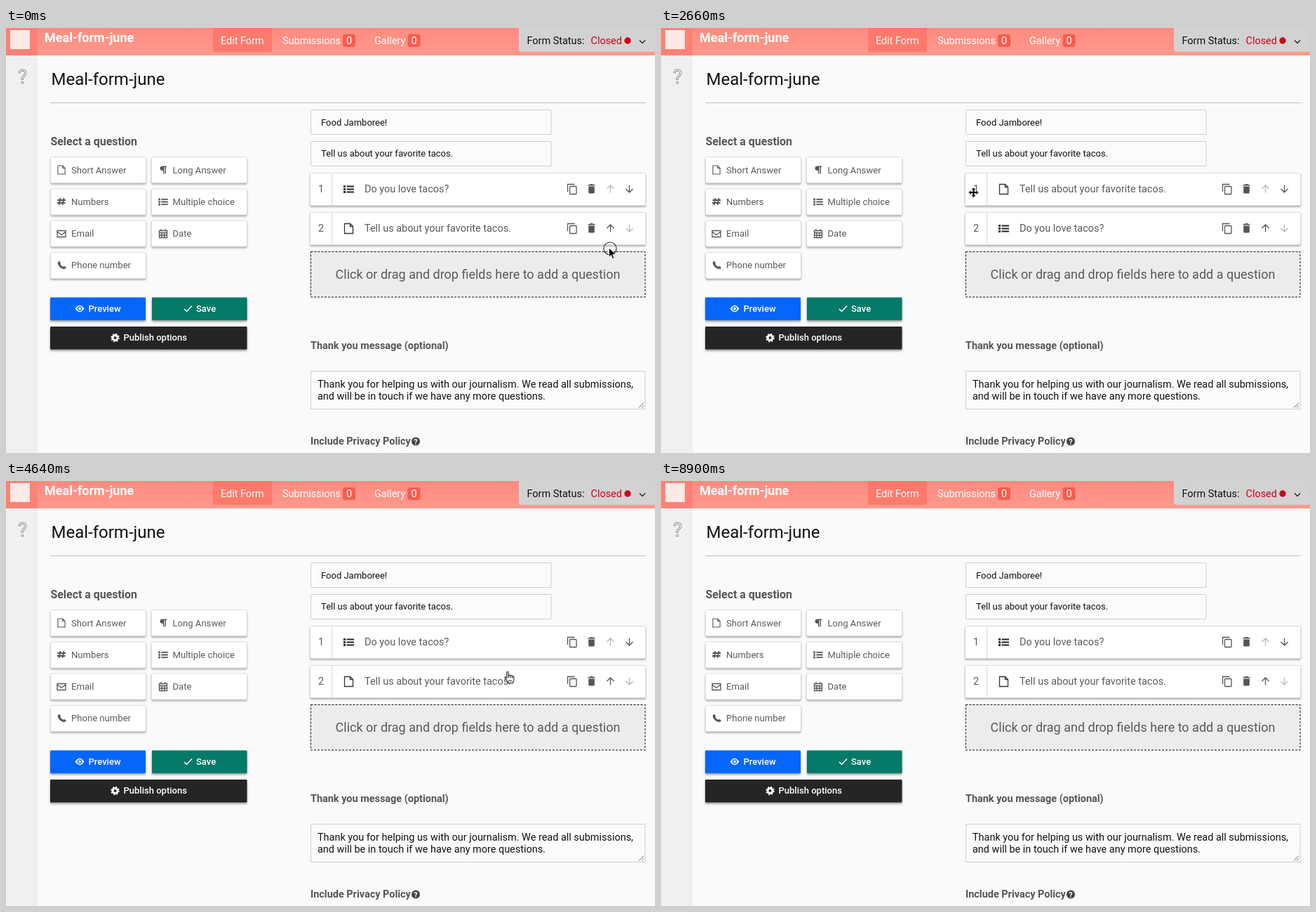
These frames come from a looping animation (925x605 px, 9950 ms). An HTML page:

```html
<!DOCTYPE html>
<html lang="en">
<head>
<meta charset="utf-8">
<title>Form editor</title>
<style>
html, body { margin: 0; width: 100%; height: 100%; overflow: hidden; background: #fafafa; }
svg { display: block; width: 925px; height: 605px; }
text { font: 14.45px Roboto, Arial, sans-serif; fill: #111; white-space: pre; }
.bold { font-weight: 700; fill: #555; }
.small { font-size: 13.1px; }
.grey { fill: #5a5a5a; }
.white { fill: #fff; }
.medium { font-size: 13px; font-weight: 500; fill: #fff; }
.mid { text-anchor: middle; }
.line { fill: none; stroke: #555; stroke-width: 1.3; }
.card { fill: #fff; stroke: #dcdcdc; filter: drop-shadow(0 2px 1px rgba(0,0,0,.28)); }
.field { fill: #fbfbfb; stroke: #cfcfcf; }
.btn { filter: drop-shadow(0 2px 1.5px rgba(0,0,0,.4)); }
.dim { opacity: .42; }

/* one loop: 9950ms, 1% = 99.5ms */
.move, .order, .hole, .lower, .zone, .arrow, .hand, .mover, .ring {
  animation: 9950ms step-end infinite;
}
.move { animation-name: move; animation-timing-function: ease-in-out; }
.order { animation-name: order; }
.hole { animation-name: hole; }
.lower { animation-name: lower; }
.zone { animation-name: zone; }
.arrow { animation-name: arrow; }
.hand { animation-name: hand; }
.mover { animation-name: mover; }
.ring { animation-name: ring; }
.ghost1, .ghost2 { opacity: .78; animation: ghost1 9950ms step-end infinite; }
.ghost2 { animation-name: ghost2; }

@keyframes move {
  0%, .1% { transform: translate(861px, 314px); }
  7.24%, 8.9% { transform: translate(614.5px, 283px); }
  11.26%, 12.9% { transform: translate(438px, 276px); }
  15.78%, 18.6% { transform: translate(447px, 284.5px); }
  20.5%, 22.01% { transform: translate(444.3px, 240.7px); }
  27.34%, 29.5% { transform: translate(445.5px, 234px); }
  34.17% { transform: translate(444.2px, 283px); }
  35.98%, 37.4% { transform: translate(445.5px, 284.5px); }
  42% { transform: translate(448px, 231px); }
  43.52%, 44.7% { transform: translate(448px, 222px); }
  46.63%, 48.3% { transform: translate(715.5px, 269px); }
  51.76%, 53.7% { transform: translate(881px, 287px); }
  56.88%, 58.8% { transform: translate(866.5px, 285.5px); }
  61.1%, 67.5% { transform: translate(858.5px, 284px); }
  71.66%, 84.1% { transform: translate(863.5px, 280px); }
  86.43%, 88.1% { transform: translate(881px, 474px); }
  89.45%, 100% { transform: translate(906px, 606px); }
}
@keyframes order {
  0%, 42.51%, 78.39%, 100% { transform: none; }
  19.7%, 64.42% { transform: translateY(var(--swap)); }
  39.6% { transform: none; }
}
@keyframes hole {
  0%, 26.33%, 42.51%, 100% { visibility: hidden; transform: none; }
  18.79%, 37.59% { visibility: visible; transform: translateY(56px); }
  19.7%, 39.6% { visibility: visible; transform: none; }
}
@keyframes lower {
  0%, 26.33%, 42.51%, 100% { transform: none; }
  18.79%, 37.59% { transform: translateY(-83px); }
}
@keyframes zone {
  0%, 26.33%, 42.51%, 100% { visibility: visible; }
  18.79%, 37.59% { visibility: hidden; }
}
@keyframes ghost1 {
  0%, 26.33%, 100% { visibility: hidden; }
  18.79% { visibility: visible; }
}
@keyframes ghost2 {
  0%, 42.51%, 100% { visibility: hidden; }
  37.59% { visibility: visible; }
}
@keyframes arrow {
  0%, 18.79%, 37.59%, 84.9% { visibility: visible; }
  1.8%, 26.33%, 42.51%, 89.4%, 100% { visibility: hidden; }
}
@keyframes hand {
  0%, 10.6%, 84.9%, 100% { visibility: hidden; }
  1.8%, 45.2% { visibility: visible; }
}
@keyframes mover {
  0%, 18.79%, 37.59%, 45.2%, 100% { visibility: hidden; }
  10.6%, 26.33%, 42.51% { visibility: visible; }
}
@keyframes ring {
  0%, 15.6%, 35.8%, 63.8%, 76.78% { visibility: visible; }
  .2%, 26.33%, 42.51%, 65.3%, 78.5%, 100% { visibility: hidden; }
}
</style>
</head>
<body>
<svg viewBox="0 0 925 605">
  <defs>
    <linearGradient id="bar" x2="0" y2="1">
      <stop stop-color="#ff8b80"/><stop offset="1" stop-color="#ff998c"/>
    </linearGradient>

    <!-- icons, centred on 0,0 -->
    <g id="list">
      <path d="M-7.5-5.5h3v3h-3zm0 4h3v3h-3zm0 4h3v3h-3zM-3-5h10.5v2H-3zm0 4h10.5v2H-3zm0 4h10.5v2H-3z"/>
    </g>
    <path id="page" d="M-6-7H2L6-3V7H-6zM2-7v4h4M-3.500h7M-3.500 0h7M-3.500 2.200h7M-3.500 4.400h7"/>
    <g id="copy" class="line">
      <rect x="-3.500" y="-3.500" width="9.500" height="11" rx="1"/>
      <path d="M-6.500 4V-6.500H3.500"/>
    </g>
    <path id="bin" fill="#555" d="M-5-6h2.500l1-1h3l1 1H5v1.600H-5zM-4.300-3.400h8.600V5q0 1.500-1.500 1.500h-5.600Q-4.300 6.500-4.300 5z"/>
    <path id="up" class="line" stroke-width="1.500" d="M0 5.500V-5M-5 0l5-5 5 5"/>
    <g id="help">
      <circle r="6" fill="#444"/>
      <text class="mid white" y="4" style="font-size:11px;font-weight:700">?</text>
    </g>

    <!-- row parts -->
    <g id="frame">
      <rect class="card" x="433.500" y="206.500" width="478" height="46" rx="1"/>
      <path stroke="#d8d8d8" d="M464.500 207v45"/>
      <use href="#copy" x="807" y="229"/>
      <use href="#bin" x="834.500" y="229"/>
    </g>
    <g id="row1">
      <use href="#frame"/>
      <text class="mid grey" x="449" y="234.300">1</text>
      <use href="#up" x="861.500" y="229" class="dim"/>
      <use href="#up" transform="translate(888.500 229) scale(1 -1)"/>
    </g>
    <g id="row2">
      <use href="#frame" y="56"/>
      <text class="mid grey" x="449" y="290.300">2</text>
      <use href="#up" x="861.500" y="285"/>
      <use href="#up" transform="translate(888.500 285) scale(1 -1)" class="dim"/>
    </g>
    <g id="love">
      <use href="#list" x="488.500" y="229.500" fill="#222"/>
      <text class="grey" x="511" y="234.300">Do you love tacos?</text>
    </g>
    <g id="tell">
      <use href="#page" class="line" style="stroke:#333" x="488.500" y="285.500"/>
      <text class="grey" x="511" y="290.300">Tell us about your favorite tacos.</text>
    </g>
    <rect id="pick" class="card" width="136" height="37" rx="2"/>
    <path id="grip" stroke="#666" d="M0 7L7 0M4 7l3-3"/>
  </defs>

  <rect width="925" height="605" fill="#fafafa"/>
  <rect y="38" width="45" height="567" fill="#f0f0f0"/>

  <!-- header -->
  <rect width="925" height="39" fill="url(#bar)"/>
  <rect width="45" height="39" fill="#ff8175"/>
  <rect x="6" y="3" width="28" height="27" fill="#ffe9e5"/>
  <text class="white" x="55" y="20" style="font-size:18px;font-weight:700">Meal-form-june</text>
  <path fill="#ff7a6c" d="M295 0h84v31q0 3-3 3h-78q-3 0-3-3z"/>
  <text class="white" x="306" y="23">Edit Form</text>
  <text class="white" x="394" y="23">Submissions</text>
  <rect x="480" y="9" width="18" height="18" rx="4" fill="#f95b4e"/>
  <text class="white mid" x="489" y="23">0</text>
  <text class="white" x="525" y="23">Gallery</text>
  <rect x="572.500" y="9" width="18" height="18" rx="4" fill="#f95b4e"/>
  <text class="white mid" x="581.500" y="23">0</text>
  <path fill="#d2d2d2" d="M731 0h194v34H735q-4 0-4-4z"/>
  <text x="742.500" y="23">Form Status:</text>
  <text x="833.500" y="23" style="fill:#d0021b">Closed</text>
  <circle cx="886" cy="18" r="4.700" fill="#d0021b"/>
  <path class="line" style="stroke:#222" d="M903 17.500l4 4 4-4"/>

  <text class="mid" x="23.500" y="79" style="font-size:28px;fill:#f6f6f6;stroke:#8a8a8a;stroke-width:.9">?</text>
  <text x="64.500" y="80.500" style="font-size:24px">Meal-form-june</text>
  <path stroke="#bfbfbf" d="M63 106.500h848.500"/>

  <!-- question types -->
  <text class="bold" x="63.500" y="166.500" style="font-size:15.900px">Select a question</text>
  <use href="#pick" x="63.500" y="183.500"/>
  <use href="#pick" x="207.500" y="183.500"/>
  <use href="#pick" x="63.500" y="229"/>
  <use href="#pick" x="207.500" y="229"/>
  <use href="#pick" x="63.500" y="274"/>
  <use href="#pick" x="207.500" y="274"/>
  <use href="#pick" x="63.500" y="319.500"/>
  <g class="line">
    <use href="#page" transform="translate(79 202) scale(.85)"/>
    <path d="M75.500 252l2-10M80.500 252l2-10M73.500 245h11.500M73 249h11.500" stroke-width="1.800"/>
    <path d="M73 288.500h12v9H73zM73 290l6 4.500 6-4.500"/>
    <path d="M218.500 288.500h11v10h-11zM218 291.500h12M222 291v7M226 291v7M218.500 295h11M221 286v3M227 286v3"/>
    <path d="M75 334q1 6 8 8" stroke-width="3"/>
  </g>
  <path fill="#555" d="M229 196.500v1.500h-1v9.500h-1.400V198h-1.200v9.500H224V203q-4.500 0-4.500-3.200 0-3.300 4.500-3.300zM73.800 333l2.700-1 1.500 3.500-2 1.500zM81 341l1.500-2 3.200 1.600-1 2.700z"/>
  <use href="#list" transform="translate(224 247.500) scale(.9)" fill="#555"/>
  <g>
    <text class="small grey" x="93" y="206.500">Short Answer</text>
    <text class="small grey" x="237.500" y="206.500">Long Answer</text>
    <text class="small grey" x="93" y="252">Numbers</text>
    <text class="small grey" x="237.500" y="252">Multiple choice</text>
    <text class="small grey" x="93" y="297">Email</text>
    <text class="small grey" x="237.500" y="297">Date</text>
    <text class="small grey" x="93" y="342">Phone number</text>
  </g>

  <!-- actions -->
  <rect class="btn" x="63" y="383.500" width="136" height="32.500" rx="1" fill="#0566fb"/>
  <path fill="#fff" d="M98.500 399.500q6.500-9.500 13 0-6.500 9.500-13 0z"/>
  <circle cx="105" cy="399.500" r="2.600" fill="#fff" stroke="#0566fb" stroke-width="1.400"/>
  <text class="medium" x="117.500" y="403.700">Preview</text>
  <rect class="btn" x="208" y="383.500" width="135.500" height="32.500" rx="1" fill="#057a69"/>
  <path fill="none" stroke="#fff" stroke-width="1.500" d="M254 400l3.500 3.500 7.500-8"/>
  <text class="medium" x="271" y="403.700">Save</text>
  <rect class="btn" x="63" y="425" width="280.500" height="32.500" rx="1" fill="#252525"/>
  <circle cx="155.500" cy="441" r="3.500" fill="none" stroke="#fff" stroke-width="3"/>
  <circle cx="155.500" cy="441" r="5.300" fill="none" stroke="#fff" stroke-width="1.800" stroke-dasharray="2.100 2.060"/>
  <text class="medium" x="167.500" y="445.300">Publish options</text>

  <!-- form -->
  <rect class="field" x="434.500" y="116.500" width="342.500" height="35" rx="1"/>
  <text x="449" y="138.500" style="font-size:13px">Food Jamboree!</text>
  <rect class="field" x="434.500" y="161.500" width="342.500" height="35" rx="1"/>
  <text x="449" y="182.700" style="font-size:13px">Tell us about your favorite tacos.</text>

  <use href="#row1"/>
  <use href="#row2"/>
  <g class="order" style="--swap:56px"><use href="#love"/></g>
  <g class="order" style="--swap:-56px"><use href="#tell"/></g>
  <g class="hole">
    <rect x="432" y="205" width="482" height="52" fill="#fafafa"/>
    <rect x="434.500" y="206.500" width="476.500" height="46" fill="#b5d3c3" stroke="#222" stroke-dasharray="3 2"/>
  </g>

  <g class="zone">
    <rect x="434.500" y="318.500" width="476.500" height="64.500" fill="#ececec" stroke="#111" stroke-dasharray="3 2"/>
    <text class="mid grey" x="672.500" y="357" style="font-size:18px">Click or drag and drop fields here to add a question</text>
  </g>

  <g class="lower">
    <text class="bold" x="434" y="456.700">Thank you message (optional)</text>
    <rect class="field" x="434.500" y="488.500" width="476.500" height="54"/>
    <text x="444" y="512">Thank you for helping us with our journalism. We read all submissions,</text>
    <text x="444" y="529">and will be in touch if we have any more questions.</text>
    <use href="#grip" x="902" y="533.500"/>
    <text class="bold" x="434" y="592.500">Include Privacy Policy</text>
    <use href="#help" x="584" y="588.500"/>
    <rect class="field" x="434.500" y="624.500" width="476.500" height="53"/>
    <use href="#grip" x="902" y="669"/>
  </g>

  <!-- dragged rows follow the pointer from where they were grabbed -->
  <g class="move"><g class="ghost1"><g transform="translate(-447 -283)">
    <use href="#row2"/><use href="#tell"/>
  </g></g></g>
  <g class="move"><g class="ghost2"><g transform="translate(-445.500 -284.500)">
    <use href="#row2"/><use href="#love" y="56"/>
  </g></g></g>

  <!-- pointer -->
  <g class="move">
    <circle class="ring" r="9" fill="none" stroke="#222" stroke-width="1.100"/>
    <path class="arrow" stroke="#fff" stroke-width=".8" d="M-1.500-1v13l3-2.800 2.200 5.300 2.200-1-2.200-5h4.300z"/>
    <path class="hand" fill="#fff" stroke="#111" stroke-width="1.100" stroke-linejoin="round"
      d="M-2 4q0-1.500 1.300-1.500T.6 4v4.300q.3-1 1.500-1t1.400 1q.3-.6 1.400-.6 1.200 0 1.400 1.100 2-.5 2 1.500v3.200q0 2.500-1.500 4v1.300h-6.300v-1.300q-2.500-2.500-4.700-5.700-.6-1.300.4-1.700 1-.3 2 1L-2 12zM.6 8v3.500M3.500 8.500v3M6.300 9v2.500M2 14v2.500M4.300 14v2.500"/>
    <path class="mover" stroke="#fff" stroke-width=".8" paint-order="stroke"
      d="M0-7l3 3.300H1V-1h2.700v-2L7 0 3.700 3V1H1v2.700h2L0 7l-3-3.300h2V1h-2.700v2L-7 0l3.300-3v2H-1v-2.700h-2z"/>
  </g>
</svg>
</body>
</html>
```
